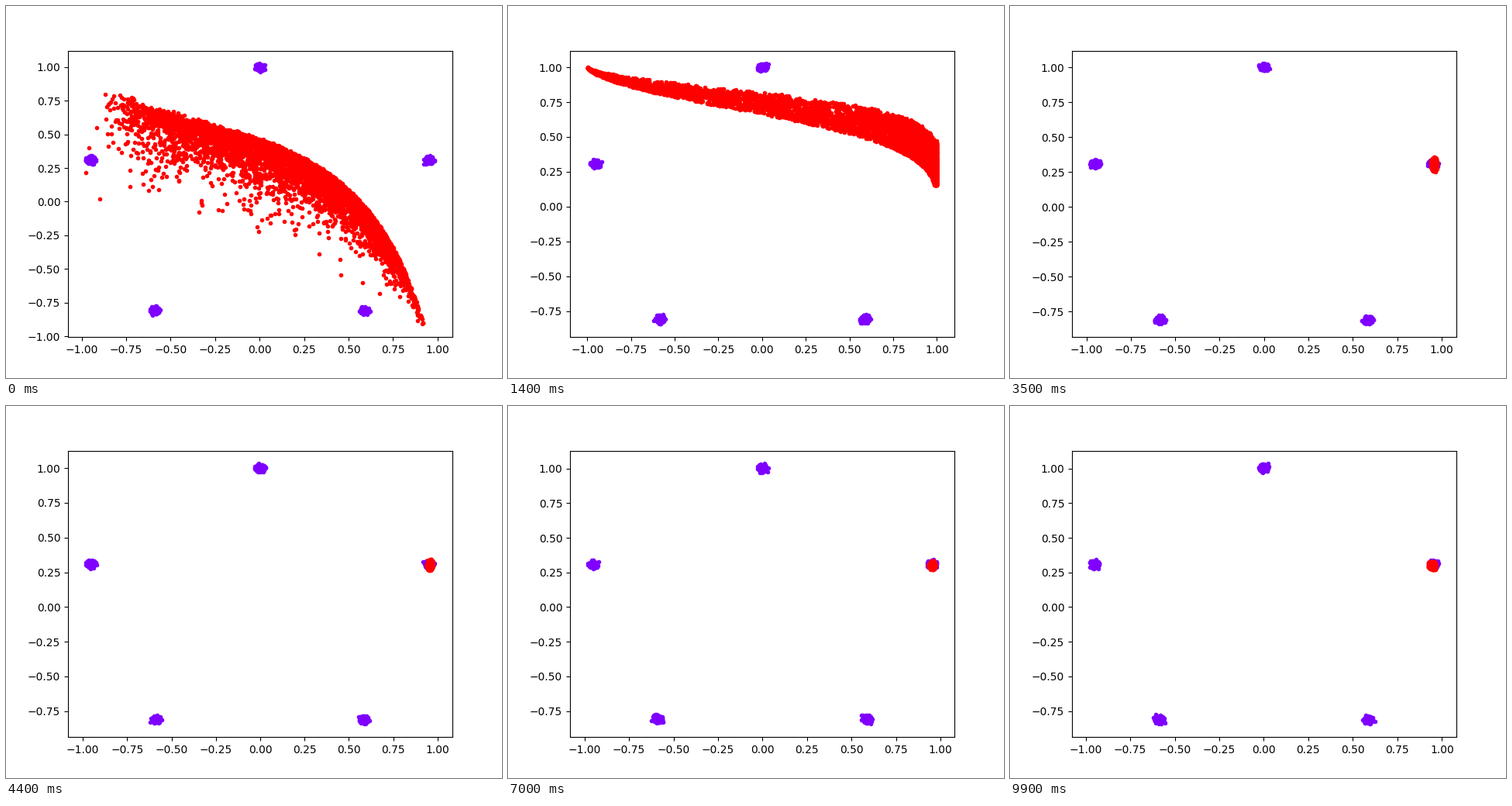
Write a matplotlib script that moves like this. It is 640 by 480 pixels and loops after 10000 ms.

```python
import numpy as np
import matplotlib.pyplot as plt
from matplotlib.animation import FuncAnimation

FRAMES, INTERVAL = 100, 100
PER_MODE, N_FAKE = 200, 5000
MODE_SD = 0.0115
POSE_FRAMES = (0, 14, 22, 27)


def real_points(rng):
    angle = np.pi / 2 + 2 * np.pi * np.arange(5) / 5
    centres = np.column_stack([np.cos(angle), np.sin(angle)])
    noise = np.clip(rng.standard_normal((5, PER_MODE, 2)), -3, 3)
    return (centres[:, None] + MODE_SD * noise).reshape(-1, 2)


def bezier(t, a, b, c, d):
    s = 1 - t
    return s**3 * a + 3 * s**2 * t * b + 3 * s * t**2 * c + t**3 * d


# Each pose returns the values that go into the final tanh.

def arc(frame, z, n, depth):
    """Curved sheet with a sharp outer edge and a tail towards lower left."""
    t = 1 / (1 + np.exp(-.1 - z))
    d = .28 * np.sqrt(t) * (1 - t) * depth
    x = bezier(t, -.9, -.2, .62, .95) - .6 * d
    y = bezier(t, .84, .38, .70, -1.05) - .8 * d + .035 * (1 - t)**3 * n
    return np.arctanh([x, y])


def band(frame, z, n, depth):
    """Sheet pressed against the right limit, sharp below."""
    u = 1 + 1.4 * z
    low = np.log1p(np.exp(.2 - .8 * np.minimum(u, 2.5)))
    return np.array([u, low + .36 * (1 - np.exp(-.7 * depth))])


def corner(frame, z, n, depth):
    return np.array([2.6 + .5 * z, .33 - .02 * z + .05 * n])


def blob(frame, z, n, depth):
    """Everything collapsed on one mode, slowly drifting."""
    age = frame - 35
    spread = .009 + .007 * np.exp(-age / 8)
    return np.array([1.95 - .002 * age + .06 * z,
                     .315 - .0001 * age + 1.1 * spread * n])


POSES = (arc, band, corner, blob)


def fake_points(frame, rng):
    z, n = np.clip(rng.standard_normal((2, N_FAKE)), -3.4, 3.4)
    noise = z, n, np.minimum(rng.exponential(size=N_FAKE), 8)
    pos = np.interp(frame, POSE_FRAMES, range(len(POSES)))
    k = min(int(pos), len(POSES) - 2)
    w = pos - k
    return np.tanh((1 - w) * POSES[k](frame, *noise)
                   + w * POSES[k + 1](frame, *noise))


fig, ax = plt.subplots(figsize=(6.4, 4.8), dpi=100)
real, = ax.plot([], [], ".", color="#7f00ff")
fake, = ax.plot([], [], ".", color="#ff0000")


def draw(frame):
    rng = np.random.default_rng(100 + frame)
    real.set_data(*real_points(rng).T)
    fake.set_data(*fake_points(frame, rng))
    ax.relim()
    ax.autoscale_view()
    return real, fake


anim = FuncAnimation(fig, draw, frames=FRAMES, interval=INTERVAL,
                     init_func=lambda: (real, fake), repeat=True, repeat_delay=0)
plt.show()
```
